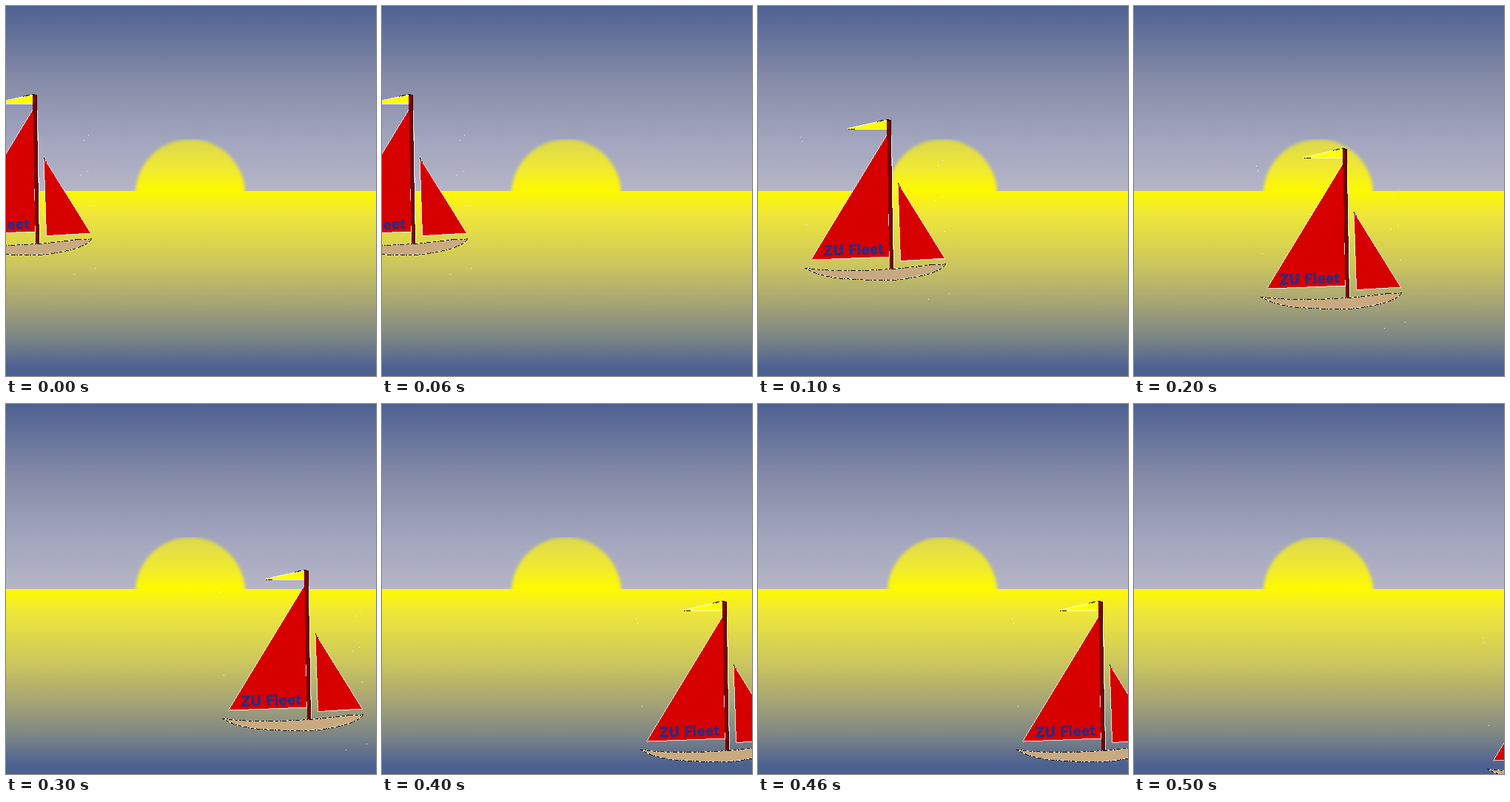
An HTML page for the animation above (600 ms loop, 500 px wide and 500 px high).

```html
<!DOCTYPE html>
<html lang="en">
<head>
<meta charset="utf-8">
<title>Sailing boat</title>
<style>
html, body { margin: 0; width: 100%; height: 100%; overflow: hidden; }
svg { display: block; width: 100%; height: 100%; }
#boat { shape-rendering: crispEdges; }
.ink { fill: none; stroke: #111; stroke-dasharray: 4 2 2 1 6 3; }
.white { stroke: #fff; stroke-width: .8; }
.sail { fill: #d60000; }
text { font: 900 19px Lato, sans-serif; letter-spacing: 1px; fill: #2c2c80; stroke: #2c2c80; stroke-width: .5; }
</style>
</head>
<body>
<svg viewBox="0 0 500 500">
  <defs>
    <linearGradient id="sky" x2="0" y2="1">
      <stop offset="0" stop-color="#4d6191"/>
      <stop offset=".4" stop-color="#868ba8"/>
      <stop offset=".75" stop-color="#a4a7bf"/>
      <stop offset="1" stop-color="#b6b5c6"/>
    </linearGradient>
    <linearGradient id="sea" x2="0" y2="1">
      <stop offset="0" stop-color="#fffa00"/>
      <stop offset=".03" stop-color="#fbf50e"/>
      <stop offset=".12" stop-color="#f0e838"/>
      <stop offset=".4" stop-color="#cbc65e"/>
      <stop offset=".6" stop-color="#a8a674"/>
      <stop offset=".8" stop-color="#7a8486"/>
      <stop offset=".95" stop-color="#4d6191"/>
      <stop offset="1" stop-color="#4d6191"/>
    </linearGradient>
    <linearGradient id="glow" gradientUnits="userSpaceOnUse" x1="0" y1="180" x2="0" y2="250">
      <stop offset="0" stop-color="#dcd850"/>
      <stop offset=".6" stop-color="#f1ea30"/>
      <stop offset=".85" stop-color="#fbf510"/>
      <stop offset="1" stop-color="#fffa00"/>
    </linearGradient>
    <filter id="soft"><feGaussianBlur stdDeviation="2"/></filter>
    <clipPath id="above"><path d="M170 180H330V250H170Z"/></clipPath>
    <path id="hull" d="M63 354Q95 358.500 135 357.500Q180 356.500 215 352Q235 349 253 349Q250 356 231 362Q205 369 180 370.500Q145 371 110 368Q82 365 63 354Z"/>
  </defs>

  <rect width="500" height="250" fill="url(#sky)"/>
  <g clip-path="url(#above)">
    <circle cx="249" cy="254" r="74" fill="url(#glow)" filter="url(#soft)"/>
  </g>
  <rect y="250" width="500" height="250" fill="url(#sea)"/>

  <g id="boat">
    <path id="specks" fill="#fff"/>
    <path class="white" fill="#ff0" d="M121 165.500L173 154H175V166H122Z"/>
    <path class="ink" stroke-dashoffset="5" d="M121 166H134M160 156.500L173 153.500H179"/>
    <path class="sail white" d="M175.500 172L177.500 339L71.500 343Z"/>
    <path class="sail white" d="M189 239L252.500 341L192.500 344.500Z"/>
    <path class="ink" d="M189 239L192.500 245"/>
    <path class="white" fill="none" d="M180.500 175L183.500 354"/>
    <path fill="#780008" d="M174 154H179.500L182.500 356H178Z"/>
    <path fill="none" stroke="#300" d="M174.500 154H179.500L180 215L182.500 356H178"/>
    <use href="#hull" class="white" fill="#c9aa80"/>
    <use href="#hull" class="ink"/>
    <text transform="translate(89.500 337.500) rotate(-2)">ZU Fleet</text>
  </g>
</svg>
<script>
const boat = document.getElementById("boat");
const specks = [[57, 177], [59, 183], [249, 208], [243, 215], [248, 257],
  [239, 262], [65, 295], [252, 304], [258, 388], [230, 396]];
document.getElementById("specks").setAttribute("d",
  specks.map(([x, y]) => `M${x} ${y}h1v1h-1z`).join(""));

// The boat jumps from stop to stop, 100 ms each.
const stops = [[-138, -34], [0, 0], [108, 39], [229, 71], [286, 113], [414, 139]];

function draw(now) {
  const [x, y] = stops[Math.floor(now / 100) % stops.length];
  boat.setAttribute("transform", `translate(${x} ${y})`);
  requestAnimationFrame(draw);
}
draw(0);
</script>
</body>
</html>
```
